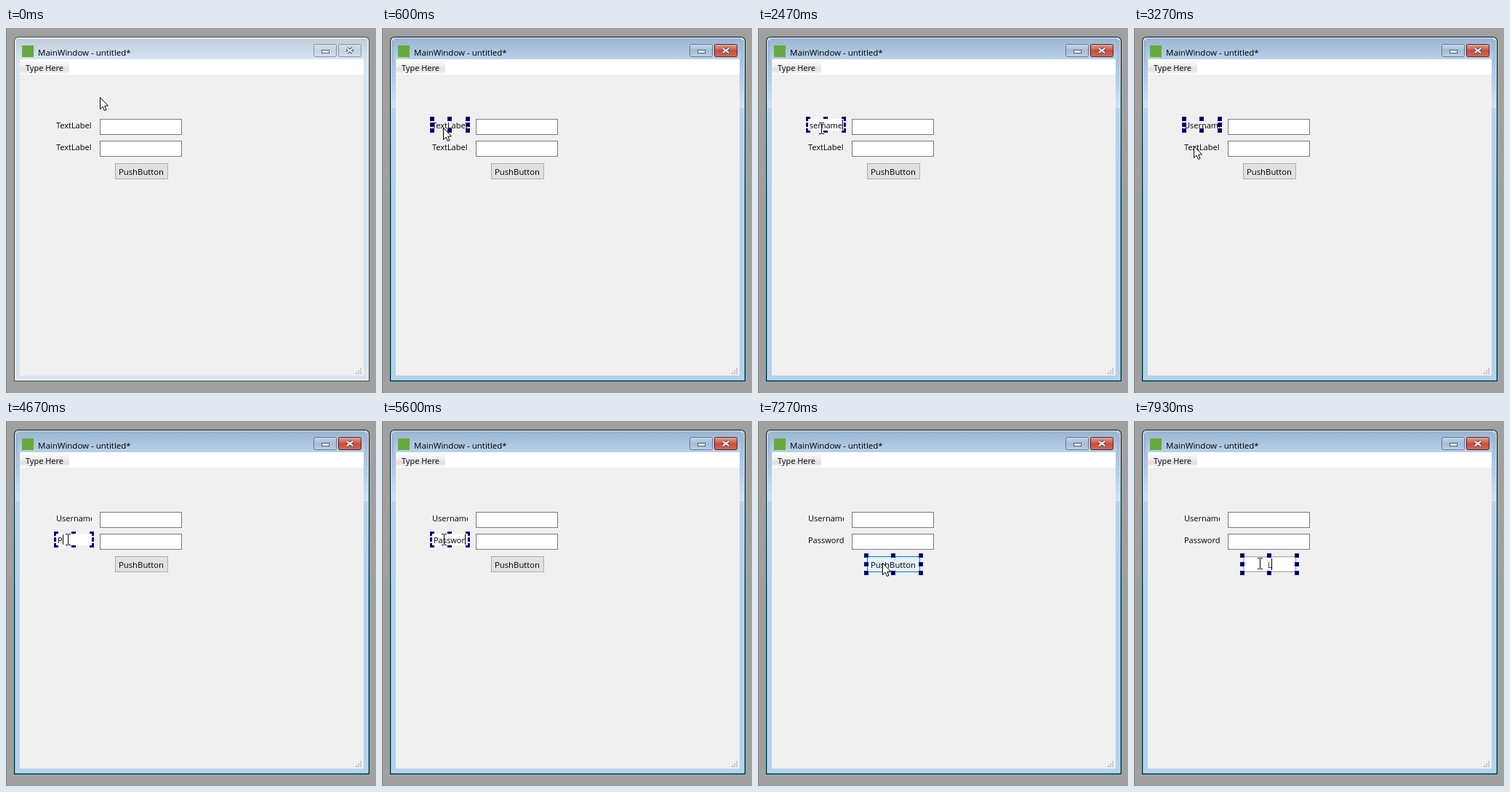
Animation of 509 by 502 pixels, one loop 8000 ms. Source, as an HTML page with a canvas:

```html
<!DOCTYPE html>
<html lang="en">
<head>
<meta charset="utf-8">
<title>Form editor</title>
<style>
  html, body { margin: 0; width: 100%; height: 100%; overflow: hidden; background: #a0a0a0; }
  canvas { display: block; }
</style>
</head>
<body>
<canvas id="stage" width="509" height="502"></canvas>
<script>
const ctx = document.getElementById('stage').getContext('2d');
const LOOP = 8000;
const TICK = 1000 / 15;
const FAMILY = '"Open Sans", "Noto Sans", sans-serif';

// Widgets: x, y, width, height
const LABEL_1 = [69, 125, 49, 16];
const LABEL_2 = [69, 155, 49, 16];
const BUTTON = [150, 186, 73, 22];

// Pointer path: tick, x, y
const PATH = [
  [0, 129, 95], [6, 84, 137], [43, 84, 137], [49, 82, 162],
  [94, 82, 162], [97, 89, 167], [101, 134, 182], [105, 171, 195]
];

// Ticks at which each in-place editor shows one more character
const EDITS = [
  { box: LABEL_1, old: 'TextLabel', text: 'Username', select: 9, open: 14, beam: 14, clear: 21,
    keys: [23, 26, 29, 31, 32, 34, 35, 37], close: 43 },
  { box: LABEL_2, old: 'TextLabel', text: 'Password', select: 58, open: 62, beam: 64, clear: 70,
    keys: [70, 73, 76, 78, 80, 83, 84, 86], close: 95 },
  { box: BUTTON, old: 'PushButton', text: 'L', select: 109, open: 114, beam: 115, clear: 118,
    keys: [119], close: 121 }
];

function rect(x, y, w, h, fill) {
  ctx.fillStyle = fill;
  ctx.fillRect(x, y, w, h);
}

function frame(x, y, w, h, color, fill) {
  rect(x, y, w, h, color);
  rect(x + 1, y + 1, w - 2, h - 2, fill);
}

function blend(x0, y0, x1, y1, ...colors) {
  const g = ctx.createLinearGradient(x0, y0, x1, y1);
  colors.forEach((c, i) => g.addColorStop(i / (colors.length - 1), c));
  return g;
}

function setFont(size) {
  ctx.font = `${size}px ${FAMILY}`;
}

function text(s, x, y, size = 11, color = '#000') {
  setFont(size);
  ctx.fillStyle = color;
  ctx.fillText(s, x, y);
}

function clipped(x, y, w, h, draw) {
  ctx.save();
  ctx.beginPath();
  ctx.rect(x, y, w, h);
  ctx.clip();
  draw();
  ctx.restore();
}

function outline(points, x, y) {
  ctx.beginPath();
  points.forEach(([px, py]) => ctx.lineTo(x + px, y + py));
  ctx.closePath();
}

function captionButton(x, active, close) {
  const fill = !active ? blend(0, 23, 0, 40, '#d3deea', '#c5d2e1', '#d5e1ee')
    : close ? blend(0, 23, 0, 40, '#e3a394', '#c84d3c', '#d0705a')
    : blend(0, 23, 0, 40, '#c3d5e9', '#a3bcd8', '#bcd3eb');
  ctx.beginPath();
  ctx.roundRect(x + 0.5, 22.5, 31, 17, 2);
  ctx.fillStyle = fill;
  ctx.fill();
  ctx.lineWidth = 1;
  ctx.strokeStyle = !active ? '#8793a1' : close ? '#5a2632' : '#667b94';
  ctx.stroke();
  if (!close) {
    frame(x + 11, 30, 11, 5, '#535766', '#fff');
    return;
  }
  const cross = (color, width) => {
    ctx.strokeStyle = color;
    ctx.lineWidth = width;
    ctx.beginPath();
    ctx.moveTo(x + 12, 28); ctx.lineTo(x + 20, 34);
    ctx.moveTo(x + 20, 28); ctx.lineTo(x + 12, 34);
    ctx.stroke();
  };
  cross('#535766', 4.2);
  cross('#fff', 2);
}

function drawWindow(active) {
  rect(0, 0, 509, 502, '#a0a0a0');
  rect(0, 0, 1, 502, '#808080');

  ctx.beginPath();
  ctx.roundRect(11, 12, 489, 474, [6, 6, 0, 0]);
  ctx.fillStyle = active ? '#101418' : '#41464c';
  ctx.fill();
  ctx.beginPath();
  ctx.roundRect(12, 13, 487, 472, [5, 5, 0, 0]);
  ctx.fillStyle = active ? blend(0, 13, 0, 485, '#e4eef8', '#35d3f2', '#35d3f2') : '#eef4fa';
  ctx.fill();
  ctx.beginPath();
  ctx.roundRect(13, 14, 485, 470, [4, 4, 0, 0]);
  ctx.fillStyle = active ? '#b9d1ea' : '#d7e4f2';
  ctx.fill();
  if (active) {
    rect(13, 17, 485, 93, blend(0, 14, 0, 110, '#99b4d1', '#b2cae3', '#d0e1f3'));
    rect(17, 14, 477, 29, blend(0, 14, 0, 43, '#99b4d1', '#b9d1ea'));
  } else {
    rect(14, 15, 483, 28, blend(0, 14, 0, 43, '#bfcddb', '#d7e4f2'));
  }

  rect(22, 24, 16, 16, '#66ab3c');
  text('MainWindow - untitled*', 44, 38, 11.5);
  captionButton(423, active, false);
  captionButton(457, active, true);

  rect(19, 43, 473, 435, '#f0f0f0');
  rect(19, 43, 473, 21, '#fff');
  const glow = ctx.createLinearGradient(0, 44, 0, 64);
  glow.addColorStop(0, 'rgba(0,0,0,0)');
  glow.addColorStop(0.7, 'rgba(0,0,0,.125)');
  glow.addColorStop(1, 'rgba(0,0,0,0)');
  rect(19, 44, 68, 20, glow);
  text('Type Here', 27, 59);

  for (let r = 0; r < 3; r++) {
    for (let c = 2 - r; c < 3; c++) rect(481 + c * 3, 468 + r * 3, 2, 2, '#bfbfbf');
  }
  frame(129, 125, 113, 22, '#7a7a7a', '#fff');
  frame(129, 155, 113, 22, '#7a7a7a', '#fff');
}

function drawHandles([x, y, w, h]) {
  const xs = [x - 3, x + Math.floor(w / 2) - 3, x + w - 3];
  const ys = [y - 3, y + h / 2 - 3, y + h - 3];
  if (w > 60) {
    xs[0]--; xs[2]++;
    ys[0]--; ys[2]++;
  }
  xs.forEach((hx, i) => ys.forEach((hy, j) => {
    if (i !== 1 || j !== 1) frame(hx, hy, 6, 6, '#0000f0', '#000');
  }));
}

function drawEditor(edit, tick) {
  const isButton = edit.box === BUTTON;
  const [x, y, w, h] = isButton ? [152, 188, 69, 18] : edit.box;
  const selected = tick < edit.clear;
  const value = selected ? edit.old : edit.text.slice(0, edit.keys.filter(k => k <= tick).length);
  const size = isButton && selected ? 11.3 : 11;
  const base = y + (isButton ? 14 : 13);
  rect(x, y, w, h, '#fff');
  setFont(size);
  const width = ctx.measureText(value).width;
  const left = isButton ? 186.5 - width / 2 : Math.min(x + 2, x + 47 - width);
  clipped(x + 1, y, w - 2, h, () => {
    if (selected) rect(left, y + 1, width, h - 2, '#0078d7');
    text(value, left, base, size, selected ? '#fff' : isButton ? '#5a0a28' : '#000');
    rect(Math.round(left + width), y + 1, 1, h - 2, '#000');
  });
}

function drawWidget(edit, tick, hover) {
  const [x, y, w, h] = edit.box;
  const value = tick < edit.close ? edit.old : edit.text;
  if (edit.box === BUTTON) {
    frame(x, y, w, h, hover ? '#0078d7' : '#adadad', hover ? '#e5f1fb' : '#e1e1e1');
    if (tick < edit.open) text(value, 155, 202, 11.3);
  } else if (tick < edit.open || tick >= edit.close) {
    clipped(x, y, w, h, () => text(value, x, y + 13));
  }
}

function pointerAt(tick) {
  let i = 0;
  while (i < PATH.length - 2 && tick >= PATH[i + 1][0]) i++;
  const [t0, x0, y0] = PATH[i], [t1, x1, y1] = PATH[i + 1];
  const p = Math.min(1, (tick - t0) / (t1 - t0));
  return [Math.round(x0 + (x1 - x0) * p), Math.round(y0 + (y1 - y0) * p)];
}

const ARROW = [[0, 0], [0, 16], [3.6, 12.6], [6, 18], [8.5, 17], [6.2, 11.8], [11, 11.4]];

function drawArrow(x, y) {
  outline(ARROW, x + 0.5, y + 0.5);
  ctx.fillStyle = '#fff';
  ctx.fill();
  ctx.lineWidth = 1;
  ctx.strokeStyle = '#000';
  ctx.stroke();
}

function drawBeam(x, y) {
  rect(x, y - 7, 1, 14, '#000');
  for (const end of [y - 8, y + 7]) {
    rect(x - 3, end, 3, 1, '#000');
    rect(x + 1, end, 3, 1, '#000');
  }
}

function draw(now) {
  const tick = Math.floor((now % LOOP + 4) / TICK);
  const [x, y] = pointerAt(tick);
  const hover = x >= 150 && y >= 186 && tick < EDITS[2].open;

  drawWindow(tick >= EDITS[0].select);
  EDITS.forEach(e => drawWidget(e, tick, hover));
  const current = EDITS.filter(e => tick >= e.select).pop();
  let beam = false;
  if (current) {
    const editing = tick >= current.open && tick < current.close;
    beam = editing && tick >= current.beam;
    drawHandles(current.box);
    if (editing) drawEditor(current, tick);
    if (editing && current.box === BUTTON) drawHandles(current.box);
  }
  if (beam) drawBeam(x + (current.box === BUTTON ? 2 : 3), y + 1);
  else drawArrow(x, y);
}

const start = performance.now();
function loop() {
  draw(performance.now() - start);
  requestAnimationFrame(loop);
}
loop();
</script>
</body>
</html>
```
